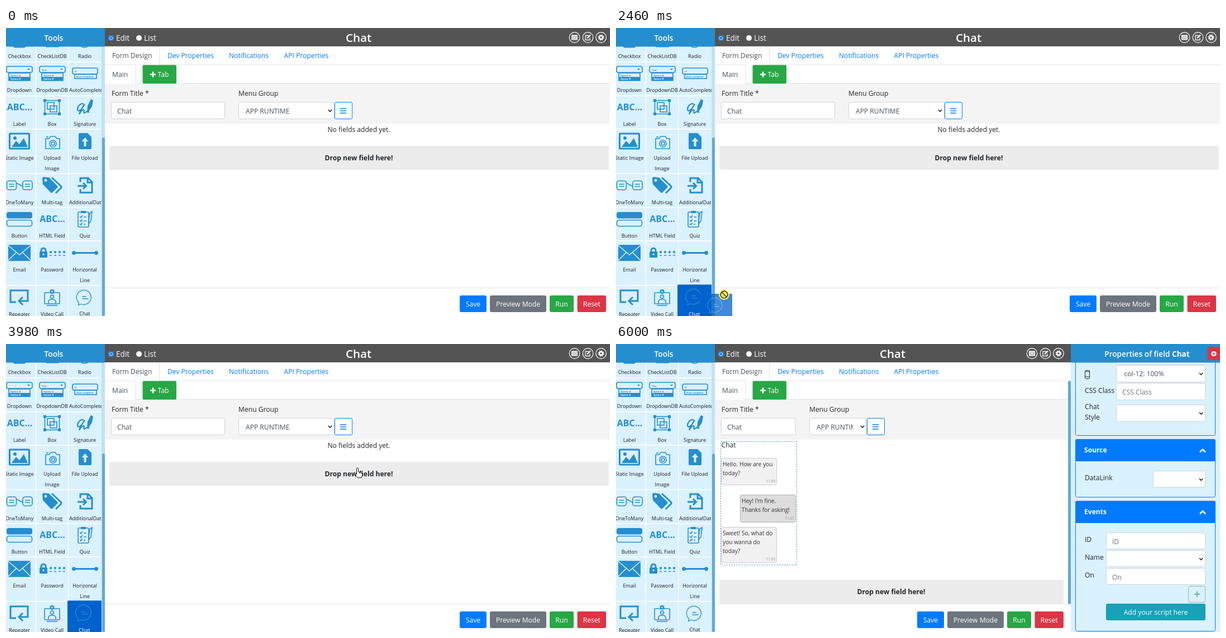
An HTML page that plays this animation: 1081 px wide and 518 px high, repeating every 6280 ms.

```html
<!DOCTYPE html>
<html lang="en">
<head>
<meta charset="utf-8">
<title>Form designer</title>
<style>
html, body { margin: 0; width: 100%; height: 100%; overflow: hidden; background: #fff; }
svg { display: block; }
#stage { width: 100vw; height: 100vh; }
text { font: 12.1px "Open Sans", "Noto Sans", sans-serif; fill: #212529; white-space: pre; }
.b { font-weight: 700; }
.link { fill: #007bff; }
.soft { fill: #495057; }
.hint { fill: #6c757d; }
.head { font-size: 13.6px; font-weight: 600; fill: #fff; }
.title { font-size: 20.6px; font-weight: 600; fill: #fff; }
.mode { font-size: 13.6px; fill: #fff; }
.tool { font-size: 9px; fill: #1c1c1c; }
.abc { font-size: 16px; font-weight: 700; fill: #258ecf; }
.tiny { font-size: 4.2px; font-weight: 700; fill: #258ecf; }
.talk { font-size: 10.2px; fill: #333; }
.time { font-size: 6.8px; fill: #999; }
.line { fill: none; stroke: #258ecf; stroke-width: 1.6; }
.fat { stroke-width: 3; }
.ink { fill: #258ecf; }
.pale { fill: #daf1fe; }
.w { fill: #fff; }
</style>
</head>
<body>
<svg id="stage" viewBox="0 0 1081 518" preserveAspectRatio="none"></svg>
<script>
const BLUE = '#007bff', HEAD = '#258ecf', PALE = '#daf1fe', RULE = '#dee2e6', THUMB = '#62a8dd', LOOP = 6280;

const rect = (x, y, w, h, fill, more = '') => `<rect x="${x}" y="${y}" width="${w}" height="${h}" fill="${fill}" ${more}/>`;
const shape = (x, y, w, h, cls, r = 0) => `<rect x="${x}" y="${y}" width="${w}" height="${h}" rx="${r}" class="${cls}"/>`;
const frame = (x, y, w, h, color = '#ced4da', fill = '#fff', r = 3, more = '') =>
  rect(x + .5, y + .5, w - 1, h - 1, fill, `stroke="${color}" rx="${r}" ${more}`);
const path = (d, cls = 'line') => `<path d="${d}" class="${cls}"/>`;
const stroke = (d, color, width = 1) => `<path d="${d}" fill="none" stroke="${color}" stroke-width="${width}"/>`;
const dot = (x, y, r, cls = 'ink') => `<circle cx="${x}" cy="${y}" r="${r}" class="${cls}"/>`;
const text = (x, y, s, cls = '', anchor = 'start') => `<text x="${x}" y="${y}" class="${cls}" text-anchor="${anchor}">${s}</text>`;
const mid = (x, y, s, cls) => text(x, y, s, cls, 'middle');
const group = (id, body) => `<g id="${id}">${body}</g>`;
const select = (x, y, w, h = 31) => frame(x, y, w, h) + stroke(`M${x + w - 11} ${y + 14}l3.2 3.2 3.2-3.2`, '#333', 1.7);
const button = (x, y, w, h, label, color, id = '') =>
  rect(x, y, w, h, color, `rx="3" id="${id}"`) + mid(x + w / 2, y + 20, label, 'w');

const chatIcon = (color) =>
  stroke('M18 30l-1 4.5 5-2a13 13 0 1 0-4-2.5zM24 19h7M24 23h11', color, 1.3);
const chatTile = (fill, icon, label) =>
  rect(0, 0, 58, 59, fill, 'rx="1.5"') + chatIcon(icon) + mid(28.5, 53, 'Chat', `tool ${label}`);

function toolIcons() {
  const dropdown = (x, label) =>
    shape(x, 69, 46, 11, 'line', 3) + path(`M${x + 37} 73h5l-2.5 3z`, 'ink') + text(x + 4, 76.5, label, 'tiny') +
    shape(x + 4, 81, 38, 13.5, 'line') + shape(x + 4, 88, 38, 7, 'ink') +
    text(x + 7, 86.5, 'Option A', 'tiny') + text(x + 7, 93.2, 'Option B', 'tiny w');
  const card = x => shape(x, 275, 17, 16, 'line', 4) + path(`M${x + 4} 281h9m-9 4h9`);
  const handles = [[69, 130], [95, 130], [69, 154], [95, 154]].map(([x, y]) => shape(x - 2, y - 2, 5, 5, 'ink')).join('');
  return [
    shape(13, 26, 22, 9.5, 'ink', 3), shape(71, 26, 24, 8.5, 'ink', 2), dot(140.5, 25, 10, 'line'),
    dropdown(1, ''), dropdown(60, 'Text'),
    shape(119, 72, 45, 11, 'line', 3), text(123, 80, 'IT', 'tiny'), shape(123, 83, 39, 8, 'line'), text(126, 89, 'Auto complete', 'tiny'),
    mid(24.5, 148, 'ABC...', 'abc'),
    shape(69.5, 130.5, 26, 24, 'line'), handles, shape(74, 134, 12, 12, 'line'), shape(79, 140, 12, 11, 'line'),
    stroke('M139 137c-5-3-11 4-11 9s5 3 9-3l4-6c-5 7-9 14-10 18 3-5 6-8 8-8s-1 6 1 6 3-3 5-3 2 2 4 1', HEAD, 2.2),
    path('M152 128l4 2-2 11-8 12-1-1 1-12z', 'ink'),
    shape(6.5, 190, 35, 27, 'line fat', 1), path('M10 214l8-11 6 6 8-11 7 16z', 'ink'), dot(16, 198, 3),
    path('M71 199h6l3-4h8l3 4h5v18H71z'), dot(84, 208, 6, 'line'), dot(84, 208, 3, 'line'), path('M72 196h4'),
    path('M130 191q0-2 2-2h14l7 7v20q0 2-2 2h-19q-2 0-2-2z', 'ink'), path('M141.500 197l6 7h-4v9h-4v-9h-4z', 'pale'),
    card(1.5), card(30), path('M19 279l11 6'),
    path('M65 271q0-3 3-3l9 1 15 15q1 2 0 3l-9 9q-2 1-3 0l-14-15z', 'ink'), dot(71, 274, 2.4, 'pale'),
    path('M82 269l16 15q2 2 0 4l-9 9', 'line fat'),
    path('M133 277v-7h14l7 7v19h-21v-6M146 270v8h8', 'line fat'), path('M128 284h15m-5-5.500l5.500 5.500-5.500 5.500', 'line fat'),
    shape(1, 331, 46, 11.5, 'ink', 4), shape(1.5, 345.5, 45, 11, 'line', 4),
    mid(83, 349, 'ABC...', 'abc'),
    shape(129, 331, 19, 27, 'line', 2), shape(134, 329, 9, 4, 'ink', 1),
    path('M132 339l2 2 3-4m2 3h5m-12 6l2 2 3-4m2 3h5m-12 5l2 2 3-4m2 3h3'), path('M150 333l4-3-2 17-4 5 0-5z'),
    shape(4, 390, 40, 29, 'ink', 1), stroke('M4 391l20 17 20-17M4 418l14-14m12 0l14 14', PALE, 1.5),
    shape(60, 402, 14, 11, 'ink', 1.5), path('M63 403v-3a4 4 0 0 1 8 0v3', 'line fat'), dot(67, 407, 1.6, 'pale'),
    [78, 86, 94, 102].map(x => path(`M${x} 409h4M${x} 403h4m-3.200-1.700l2.400 3.400m0-3.400l-2.400 3.400`)).join(''),
    path('M121 404.500h41', 'line fat'), dot(121.5, 404.5, 3.4), dot(161.5, 404.5, 3.4),
    path('M18 493H8V472h31v19H25', 'line fat'), path('M30 484l-7 7 7 7', 'line fat'),
    shape(69, 476, 27, 20, 'line', 1), dot(82.5, 474, 4), dot(82.5, 474, 1.5, 'pale'),
    dot(82.5, 483, 3, 'line'), path('M76 495v-3q0-4 6.500-4t6.500 4v3'), path('M73 499h19'),
  ].join('');
}

function toolPanel() {
  const rows = [[33, 27], [62, 59], [123, 58], [183, 78], [263, 59], [324, 58], [384, 78], [464, 59]];
  const labels = [
    'Checkbox|CheckListDB|Radio', 'Dropdown|DropdownDB|', 'Label|Box|Signature', 'Static Image|Upload/Image|File Upload',
    'OneToMany|Multi-tag|', 'Button|HTML Field|Quiz', 'Email|Password|Horizontal/Line', 'Repeater|Video Call|'];
  const baselines = [54, 115, 176, 237, 316.5, 377, 438, 518];
  const cols = [[-5, 57.5], [54.5, 56.5], [112.5, 58.5]], centers = [24, 82.5, 141];
  let out = rect(0, 33, 171, 485, '#f6fcff');
  rows.forEach(([y, h], r) => {
    cols.forEach(([x, w]) => out += rect(x, y, w, h, PALE, 'rx="1.5"'));
    labels[r].split('|').forEach((label, c) =>
      label.split('/').forEach((part, i) => out += mid(centers[c], baselines[r] + 19 * i, part, 'tool')));
  });
  out += text(113, 115, 'AutoComplete', 'tool') + text(113, 316.5, 'AdditionalData', 'tool') + toolIcons();
  out += group('idle', `<g transform="translate(112.500 464)">${chatTile(PALE, HEAD, '')}</g>`);
  const big = 'transform="translate(110 461.500) scale(1.06)"';
  out += group('hover', rect(109, 461, 62, 57, '#f6fcff') + `<g ${big}>${chatTile(PALE, HEAD, '')}</g>`);
  out += group('active', `<g ${big}>${chatTile('#0062cc', '#2f83d6', 'w')}</g>`);
  return `<svg x="0" y="33" width="171" height="485" viewBox="0 33 171 485">${out}</svg>` +
    rect(171, 33, 6, 485, '#bfe2f7') + rect(172, 197, 5, 321, THUMB, 'rx="2.5"') +
    rect(0, 0, 177, 33.5, HEAD) + mid(85.5, 23, 'Tools', 'head b');
}

function headerIcons(dx) {
  const ring = x => `<circle cx="${x}" cy="17" r="9.300" fill="none" stroke="#fff" stroke-width="1.200"/>`;
  return `<g transform="translate(${dx} 0)">` + [1017.5, 1041.5, 1065].map(ring).join('') +
    rect(1012, 12.5, 11, 9, '#fff', 'rx="1"') + stroke('M1013 15h9m-9 2.200h9m-9 2.200h9', '#777', .8) +
    stroke('M1043 13.500h-6v8h8v-4', '#fff', 1.3) + stroke('M1040 18.500l6-6', '#fff', 2.2) +
    '<circle cx="1065" cy="17" r="3" fill="none" stroke="#fff" stroke-width="2.400"/>' +
    '<circle cx="1065" cy="17" r="4.600" fill="none" stroke="#fff" stroke-width="1.800" stroke-dasharray="1.900 1.710"/></g>';
}

function workspace(open) {
  const right = open ? 808 : 1081, dx = open ? -273 : 0, center = open ? 495 : 631;
  const inputW = open ? 134 : 204, menuX = open ? 346 : 416, menuW = open ? 103 : 172, burger = menuX + menuW;
  return [
    rect(177, 0, open ? 637 : 904, 518, '#fff'), rect(177, 0, open ? 637 : 904, 33, '#545454'),
    '<circle cx="188" cy="18" r="5" fill="#fff"/><circle cx="188" cy="18" r="4" fill="none" stroke="#0075ff" stroke-width="1.800"/><circle cx="188" cy="18" r="2.300" fill="#0075ff"/>',
    '<circle cx="238" cy="18" r="5" fill="#fff"/>',
    text(197, 23, 'Edit', 'mode'), text(247, 23, 'List', 'mode'), mid(center, 25, 'Chat', 'title'), headerIcons(dx),
    stroke(`M274.500 33V66H${right}M177 66H232V99.500H${right}`, RULE),
    text(190, 54, 'Form Design', 'soft'), text(289, 54, 'Dev Properties', 'link'),
    text(399, 54, 'Notifications', 'link'), text(497.5, 54, 'API Properties', 'link'),
    text(190, 88, 'Main', 'soft'),
    rect(244.5, 66.5, 60.5, 33.5, '#28a745', 'rx="2.500"'), stroke('M258 83.500h10m-5-5v10', '#fff', 2.6), text(271.5, 88, 'Tab', 'w'),
    rect(177, 100, right - 177, 72, '#f4f4f4'),
    text(189, 122, 'Form Title *'), frame(188, 133, inputW, 31), text(199, 154, 'Chat', 'soft'),
    text(menuX, 122, 'Menu Group'), select(menuX, 133, menuW),
    `<svg x="${menuX + 13}" y="134" width="${menuW - 37.5}" height="30">${text(0, 20, 'APP RUNTIME', 'soft')}</svg>`,
    frame(burger, 133, 32, 31, BLUE, '#fff', 2), stroke(`M${burger + 10} 145h11m-11 4h11m-11 4h11`, BLUE, 1.7),
    open ? '' : mid(631.5, 186.5, 'No fields added yet.') + rect(185, 212, 894, 43, '#ececec') + mid(631.5, 238, 'Drop new field here!', 'b'),
    open ? group('editing', chatField(true)) + group('done', chatField(false)) : '',
    rect(177, 468, open ? 637 : 904, 50, '#fff'), stroke(`M177 467.500H${open ? 814 : 1081}`, RULE),
    button(812 + dx, 481, 48, 30, 'Save', BLUE), button(866 + dx, 481, 101, 30, 'Preview Mode', '#6c757d'),
    button(973 + dx, 481, 43, 30, 'Run', '#28a745'), button(1022.5 + dx, 481, 51.5, 30, 'Reset', '#dc3545'),
    open ? rect(809, 66, 5, 402, THUMB, 'rx="2.500"') : '',
  ].join('');
}

function chatField(editing) {
  const dy = editing ? 0 : -29;
  const bubble = (x, y, h, lines, time, fill, edge) => frame(x, y + dy, 100, h, edge, fill, 3) +
    lines.map((line, i) => text(x + 3, y + 15 + 15.9 * i + dy, line, 'talk')).join('') +
    text(x + 97.5, y + h - 5 + dy, time, 'time', 'end');
  const top = editing
    ? frame(187, 172, 137, 50, '#80bdff', '#fff', 2) + text(199, 192, 'Chat', 'b soft') +
      stroke('M227.500 180v14', '#222') + stroke('M314 220l7-7m-3 7l3-3', '#777')
    : text(188.5, 186, 'Chat');
  const boxY = editing ? 172 : 175;
  return rect(185, 453 + dy, 616, 43, '#ececec') + (editing ? '' : mid(492.5, 450, 'Drop new field here!', 'b')) + top +
    frame(187, boxY, 137, editing ? 255 : 223, '#6b93d6', 'none', 0, 'stroke-dasharray="2.500 2"') +
    bubble(188, 234, 49, ['Hello. How are you', 'today?'], '11:00', '#f1f1f1', '#cbcbcb') +
    bubble(222, 300, 50, ['Hey! I\'m fine.', 'Thanks for asking!'], '11:01', '#dddddd', '#b0b0b0') +
    bubble(188, 358, 65, ['Sweet! So, what do', 'you wanna do', 'today?'], '11:02', '#f1f1f1', '#cbcbcb');
}

function properties() {
  const card = (y, bottom, title) => frame(822, y, 251, bottom - y, BLUE, 'none', 3) +
    rect(822, y, 251, 40, BLUE, 'rx="3"') + text(838, y + 23.5, title, 'b w') +
    stroke(`M1045 ${y + 23.5}l5-5 5 5`, '#fff', 2.6);
  const input = (x, y, hint, h = 31) => frame(x, y, 1055 - x, h) + text(x + 11, y + 20.5, hint, 'hint');
  return [
    rect(814, 0, 267, 518, PALE),
    frame(822, 20, 251, 145, BLUE, 'none'), frame(895, 6, 160, 31),
    rect(814, 0, 267, 33.5, HEAD),
    '<text x="950.500" y="23" class="head" text-anchor="middle">Properties of field <tspan font-weight="700">Chat</tspan></text>',
    rect(1058.5, 5, 22.5, 24, '#dc3545', 'rx="2.500"'),
    '<circle cx="1070" cy="17.500" r="4.600" fill="#fff"/>', stroke('M1068.300 15.800l3.400 3.400m0-3.400l-3.400 3.400', '#dc3545', 1.5),
    frame(839, 47, 9, 16, '#222', 'none', 2), stroke('M840 49.500h8m-8 9.500h8', '#222'),
    select(895, 38, 160), text(909.5, 58, 'col-12: 100%', 'soft'),
    text(839, 87.5, 'CSS Class'), input(895, 70, 'CSS Class'),
    text(839, 117, 'Chat'), text(839, 136, 'Style'), select(895, 109, 160),
    card(171, 276, 'Source'), text(839, 245, 'DataLink'), select(961, 228, 94, 30),
    card(282, 517, 'Events'),
    text(839, 356, 'ID'), input(877, 339, 'ID', 30),
    text(839, 388, 'Name'), select(877, 371, 178, 30),
    text(839, 420, 'On'), input(877, 403, 'On', 30),
    frame(1024, 435, 31, 30, '#84bfa0', PALE), stroke('M1035 450h10m-5-5v10', '#6fb58c', 2),
    button(877, 467, 178, 30, 'Add your script here', '#17a2b8', 'script'),
  ].join('');
}

const stage = document.getElementById('stage');
stage.innerHTML = toolPanel() + group('closed', workspace(false)) + group('opened', workspace(true) + properties()) +
  group('ghost', `<g opacity=".75">${chatTile('#0062cc', '#3f92de', 'w')}</g>` + mid(28.5, 53, 'Chat', 'tool w')) +
  group('press', '<circle r="9.500" fill="#f4ee5a"/>') +
  group('ban', '<circle r="6.300" fill="none" stroke="#222" stroke-width="1.400"/>' + stroke('M-4.500-4.500l9 9', '#222', 1.4)) +
  group('arrow', '<path d="M.5.500v12.500l2.900-2.700 2 4.700 2.200-.9-2-4.600h4z" fill="#fff" stroke="#111"/>') +
  group('hand', '<path d="M-1.500 1.500q1.500-2 3 0v6.500l5 1q2 .5 2 2.500v3l-1.500 4h-6.500l-5-6.500q0-2 3 0z" fill="#fff" stroke="#111" stroke-linejoin="round"/>' +
    stroke('M3.500 8v3m2.500-2.500v3', '#111', .8));

const part = Object.fromEntries([...stage.querySelectorAll('[id]')].filter(e => e.id).map(e => [e.id, e]));

// Way points: time, x, y.
const POINTER = [
  [460, 946, 514], [600, 850, 513], [740, 745, 490], [890, 645, 462], [1060, 572, 469], [1140, 545, 470], [1740, 178, 469],
  [1809, 159.5, 470], [2110, 164, 477], [2395, 165, 478], [2460, 200, 480], [2660, 355, 475], [2874, 522, 447],
  [3016, 596, 391], [3229, 629.5, 317], [3440, 637, 255], [3720, 629, 222], [3980, 629, 222], [4110, 627, 228],
  [4380, 627, 228], [4720, 806, 423], [4900, 885, 474], [5070, 930, 495], [5140, 940, 510]];
const GHOST = [[2460, 150, 478], [2660, 300, 468], [2874, 463, 442], [3016, 546, 396], [3229, 589, 320], [3440, 599, 258], [3720, 589, 226]];

function along(points, t) {
  const i = points.findIndex(p => p[0] > t);
  if (i < 0) return points[points.length - 1].slice(1);
  if (i === 0) return points[0].slice(1);
  const [t0, x0, y0] = points[i - 1], [t1, x1, y1] = points[i], k = (t - t0) / (t1 - t0);
  return [x0 + (x1 - x0) * k, y0 + (y1 - y0) * k];
}

const show = (id, on) => part[id].style.display = on ? '' : 'none';
const place = (id, [x, y]) => part[id].setAttribute('transform', `translate(${x.toFixed(1)} ${y.toFixed(1)})`);
const within = (t, a, b) => t >= a && t < b;

function draw(t) {
  const tick = 460 + Math.floor((t - 450) / 71) * 71; // motion advances in 71 ms ticks
  const at = along(POINTER, tick), open = t >= 4110;
  const onScript = within(t, 4880, 5200), dragging = within(t, 2450, 3780);
  const banned = dragging && at[1] > 255;
  const hand = within(t, 1795, 2450) || within(t, 3780, 4110) || within(t, 4880, 5140);

  show('closed', !open);
  show('opened', open);
  show('editing', t < 6000);
  show('done', t >= 6000);
  show('idle', t < 1795 || open);
  show('hover', within(t, 1795, 2230));
  show('active', within(t, 2230, 4110));
  part.script.setAttribute('fill', onScript ? '#138496' : '#17a2b8');

  show('ghost', dragging);
  show('press', within(t, 2230, 3780));
  show('ban', banned);
  show('hand', hand);
  show('arrow', within(t, 460, 5140) && !hand && !banned);
  place('ghost', along(GHOST, tick));
  ['press', 'ban', 'hand', 'arrow'].forEach(id => place(id, at));
}

function play(now) {
  draw(now % LOOP);
  requestAnimationFrame(play);
}
draw(0);
requestAnimationFrame(play);
</script>
</body>
</html>
```
